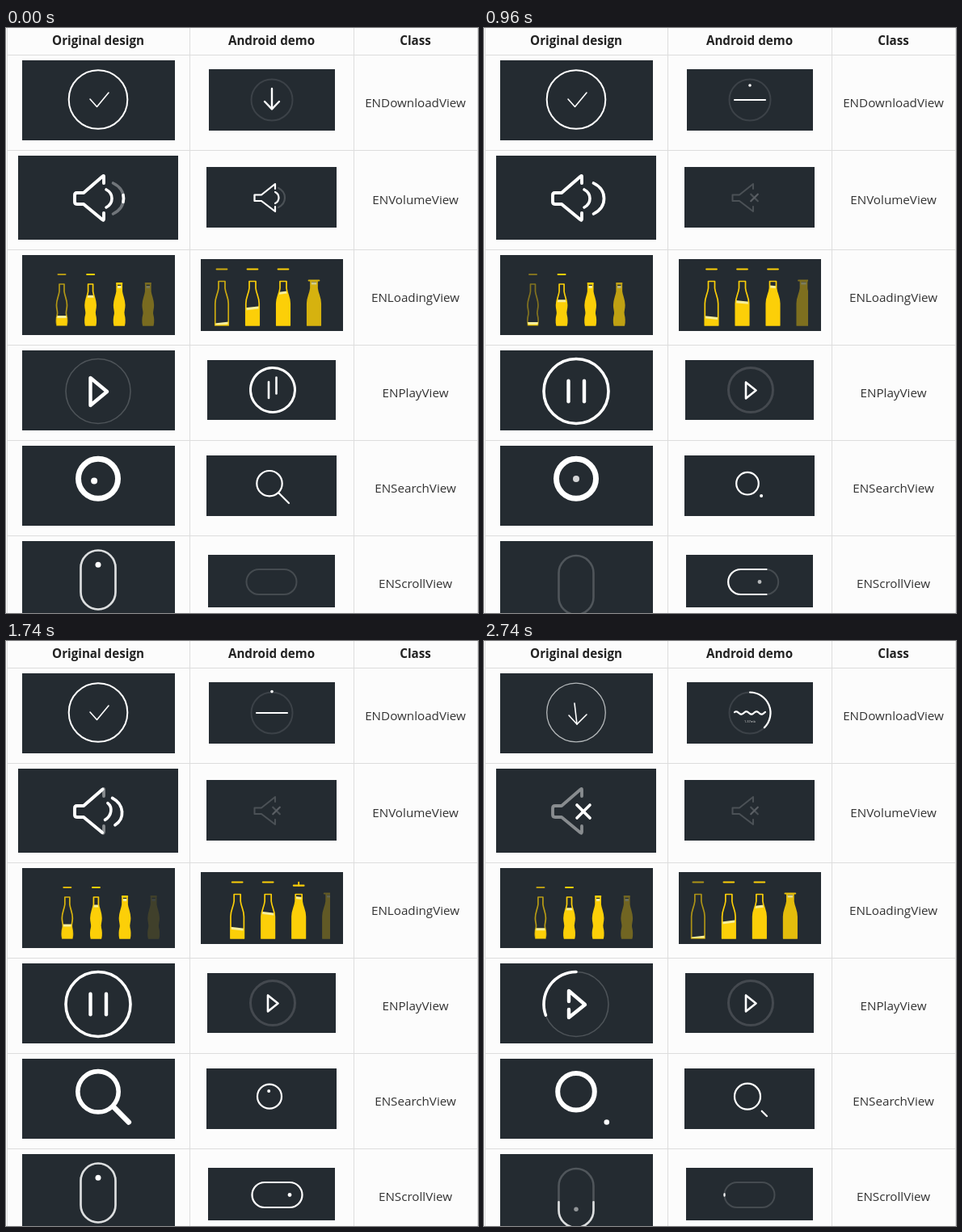
Write an HTML page that moves like this. It is 584 px wide and 724 px high and loops after 2840 ms.

```html
<!DOCTYPE html>
<html lang="en">
<head>
<meta charset="utf-8">
<title>View demos</title>
<style>
html, body { margin: 0; width: 100%; height: 100%; overflow: hidden; background: #fcfcfc; }
svg { display: block; width: 584px; height: 724px; }
text { font-family: "Open Sans", "Noto Sans", sans-serif; font-size: 15.2px; text-anchor: middle; fill: #333; }
.head { font-weight: 700; fill: #222; }
.size { fill: #ddd; }
</style>
</head>
<body>
<svg viewBox="0 0 584 724">
  <defs>
    <clipPath id="curvy"><path id="curvyShape"/></clipPath>
    <clipPath id="straight"><path id="straightShape"/></clipPath>
    <clipPath id="belt"><rect x="241" y="286" width="160" height="89"/></clipPath>
  </defs>
  <g id="table"></g>
  <g id="scene" fill="none" stroke-linecap="round" stroke-linejoin="round"></g>
</svg>
<script>
const LOOP = 2840;
// Moments at which the picture advances
const STEPS = [0, 120, 240, 390, 520, 660, 810, 960, 1110, 1230, 1380, 1500, 1620, 1740,
  1890, 2020, 2170, 2320, 2440, 2590, 2740];
const PANEL = '#242b31', YELLOW = '#fccf08', FOAM = '#f6ee9c', GREY = '#4b5156';
const $ = id => document.getElementById(id);

const clamp = (v, lo = 0, hi = 1) => Math.min(hi, Math.max(lo, v));
const lerp = (a, b, u) => Array.isArray(a) ? a.map((v, i) => lerp(v, b[i], u)) : a + (b - a) * u;
const ramp = (t, t0, t1, from = 0, to = 1) => lerp(from, to, clamp((t - t0) / (t1 - t0)));
const polar = (x, y, r, deg) => [x + r * Math.cos(deg * Math.PI / 180), y + r * Math.sin(deg * Math.PI / 180)];

const path = (d, color, w, extra = '') => `<path d="${d}" stroke="${color}" stroke-width="${w}" ${extra}/>`;
const poly = (p, w, color = '#fff', extra = '') => path('M' + p.map(q => q.join(' ')).join('L'), color, w, extra);
const dot = (x, y, r, o = 1) => `<circle cx="${x}" cy="${y}" r="${r}" fill="#fff" opacity="${o}"/>`;
const ring = (x, y, r, w, color = '#fff') => `<circle cx="${x}" cy="${y}" r="${r}" stroke="${color}" stroke-width="${w}"/>`;
const fade = (o, s) => o > 0 ? `<g opacity="${o}">${s}</g>` : '';

// Arc from the top; dir 1 runs clockwise, -1 counterclockwise
function arc(x, y, r, w, deg, dir = 1) {
  if (deg <= 0) return '';
  if (deg >= 360) return ring(x, y, r, w);
  const [ex, ey] = polar(x, y, r, dir * deg - 90);
  return path(`M${x} ${y - r}A${r} ${r} 0 ${+(deg > 180)} ${+(dir > 0)} ${ex} ${ey}`, '#fff', w);
}

// White stroke over the middle fraction f of a path
const middle = (d, w, f, color = '#fff') => f <= 0 ? '' :
  path(d, color, w, `pathLength="100" stroke-dasharray="${100 * f} 200" stroke-dashoffset="${50 * f - 50}"`);

function download(t) {
  const u = ramp(t, 2230, 2740);
  const tip = lerp([112.5, 97.5], [115, 103], u);
  let s = ring(114, 88.5, 36.3, lerp(2, 1.3, u), u > 0.5 ? '#b4b8ba' : '#fff');
  s += poly([lerp([104, 88], [105, 92], u), tip, lerp([127, 80], [127, 91], u)], 1.6);
  if (u > 0) s += poly([tip, lerp(tip, [112, 77], u)], 1.6);

  s += ring(329, 89, 25.5, 2, '#3c4248');
  const flat = ramp(t, 520, 900);
  if (flat < 1) {
    s += poly([lerp([320, 91], [309.5, 89], flat), lerp([329, 100.3], [329, 89], flat), lerp([338, 91], [348.5, 89], flat)], 2.4);
    s += poly([[329, lerp(75, 85, flat)], [329, lerp(100, 87, flat)]], 2.4);
  } else {
    const amp = ramp(t, 2020, 2170, 0, 1.7), wave = [];
    for (let x = -19; x <= 19; x++) wave.push([329 + x, 89 + amp * Math.sin(x / 2 + (t - 2170) / 900)]);
    s += poly(wave, 2.2);
    if (t < 2030) s += dot(329, ramp(t, 900, 1110, 75, 61) + ramp(t, 1230, 2020, 0, 2.5), 1.8);
  }
  s += arc(329, 89, 25.5, 2.2, (t - 2020) * 0.188);
  const size = ramp(t, 2020, 2590, 0, 4);
  if (size) s += `<text class="size" style="font-size:${size}px" x="329" y="101">${(t / 2000).toFixed(2)}mb</text>`;
  return s;
}

// Sound wave that straightens into one stroke of a cross as u goes to 1
function wave(x, y, h, bulge, cx, size, dir, u) {
  const bx = x + bulge * 4 / 3;
  const curve = [[x, y - h], [bx, y - h * 0.55], [bx, y + h * 0.55], [x, y + h]];
  const cross = [-1, -1 / 3, 1 / 3, 1].map(k => [cx + k * size * dir, y + k * size]);
  const p = lerp(curve, cross, u);
  return `M${p[0]}C${p[1]} ${p[2]} ${p[3]}`;
}

function volume(t) {
  const body = 'M121 192V184Q121 182 119 184L96 204H88Q85 204 85 207V215Q85 218 88 218H96L119 237Q121 239 121 236V229';
  const u = ramp(t, 1650, 2020) ** 1.1;
  const cx = ramp(t, 2170, 2740, 125, 123), push = ramp(t, 0, 390, -2.5, 0.5);
  const outer = wave(135 + push, 211, 19, 13, cx, 8, 1, u);
  let s = path(body, '#888c8f', 3.8) + middle(body, 3.8, ramp(t, 1560, 2060, 1, 0.5) * (t < 2060));
  s += path(outer, '#70757a', 3.6) + middle(outer, 3.6, ramp(t, 0, 300, 0.18, 1));
  s += path(wave(124, 211, 11, 7, cx, 8, -1, u), '#fff', 3.6);

  const small = 'M333 199V193L316 206.5H307.5V214H316L333 227V221';
  const v = ramp(t, 460, 900);
  const near = wave(333, 210, 7, 4.5, 334.5, 4.3, -1, v);
  s += path(small, GREY, 2) + middle(small, 2.2, ramp(t, 300, 900, 1, 0));
  s += path(wave(337, 210, 12, 8, 334.5, 4.3, 1, v), GREY, 2.2) + path(near, '#5b6065', 2.2);
  return s + fade(ramp(t, 0, 390, 0.9, 0), path(near, '#fff', 2.2));
}

const CURVY = 'M-3 317H3V326C4 333 6.5 336 6.5 343C6.5 348 5 350 5.5 354C7 360 7 364 6 368H-6' +
  'C-7 364 -7 360 -5.5 354C-5 350 -6.5 348 -6.5 343C-6.5 336 -4 333 -3 326Z';
const STRAIGHT = 'M-4 313.5H4V322C5 330 8.2 333 8.2 341V368H-8.2V341C-8.2 333 -5 330 -4 322Z';

// The glass fades in before the liquid; both fade out together
function bottle(x, shape, id, fadeIn, fadeOut, level, tilt, cap) {
  const top = `M-10 ${level - tilt}L10 ${level + tilt}`;
  return fade(fadeOut, `<g transform="translate(${x} 0)"><g clip-path="url(#${id})">` +
    `<path d="${top}V375H-10Z" fill="${YELLOW}"/>${path(top, FOAM, 3)}</g>` +
    fade(fadeIn, path(shape, YELLOW, 1.7) + cap) + '</g>');
}

function bottles(t) {
  let left = '', right = '';
  for (let x = 42 + (27 + t * 0.0653) % 35.6; x < 186; x += 35.6) {
    const drop = ramp(x, 115, 127);
    const cy = 305 + 11 * drop ** 2, half = lerp(4.5, 3.2, drop);
    const cap = poly([[-half, cy], [half, cy]], 2, YELLOW, `transform="rotate(${180 * drop} 0 ${cy})"`);
    const level = 369 - 42 * clamp((x - 58) / 55, 0, 1.2) ** 0.8;
    left += bottle(x, CURVY, 'curvy', ramp(x, 44, 82), ramp(x, 186, 160), level, 0, cap);
  }
  for (let x = 256 + (11 + t * 0.0547) % 38; x < 410; x += 38) {
    const cy = ramp(x, 358, 372, 298.5, 312.5);
    let cap = poly([[-6.3, cy], [6.3, cy]], 2.2, YELLOW);
    if (Math.abs(x - 365) < 4) cap += poly([[0, cy - 4], [0, cy]], 1.8, YELLOW);
    const level = Math.max(316, 366 - 0.505 * (x - 267));
    const tilt = -1.2 * Math.cos((x - 304) / 38 * Math.PI * 2) * (x < 366);
    right += bottle(x, STRAIGHT, 'straight', ramp(x, 256, 270), ramp(x, 410, 375), level, tilt, cap);
  }
  return left + `<g clip-path="url(#belt)">${right}</g>`;
}

// Upright pause bar as five points, and the play triangle it unfolds into
const bar = (x, y, h) => [-1, -1, 0, 1, 1].map(k => [x, y + k * h]);
const triangle = (x, y, w, h) => [[x + w, y], [x, y - h], [x, y], [x, y + h], [x + w, y]];

function play(t) {
  const tall = bar(104.5, 449.5, 12.8), big = triangle(104.5, 450, 20.5, 17);
  const open = [[118, 442], [104.5, 433], [104.5, 446], [104.5, 460], [116, 468]];
  const back = [[105, 456], [105, 466], [125, 450], [105, 433], [105, 446]];
  const closing = t > 1500;
  let s = ring(114, 449.5, 40, 1.6, '#4d5358');
  s += arc(114, 449.5, 40, 3.6, closing ? ramp(t, 2220, 2740, 360, 110) : ramp(t, 440, 900, 0, 360), closing ? -1 : 1);
  s += poly(closing ? lerp(tall.reverse(), back, ramp(t, 2200, 2740)) :
    lerp(lerp(big, open, ramp(t, 0, 390)), tall, ramp(t, 390, 860)), 4.4);
  const grown = ramp(t, 520, 880) - ramp(t, 2200, 2560);
  if (grown > 0) s += poly(bar(124, ramp(t, 2020, 2170, 449.5, 447), 12.8 * grown), 4.4);

  s += ring(330, 448, 27.5, 3, '#44494f') + arc(330, 448, 27.5, 3, ramp(t, 380, 860, 358, 0));
  s += poly(lerp(bar(325, 448, 10), triangle(324, 448.5, 12.5, 10), ramp(t, 450, 880)), 2.6);
  const rest = ramp(t, 400, 760, 1, 0);
  if (rest > 0) s += poly(bar(334.5, ramp(t, 0, 240, 442.5, 448), 10 * rest), 2.6);
  return s;
}

function search(t) {
  const out = ramp(t, 960, 1380), back = ramp(t, 2300, 2740), end = [151.8, 595.5];
  let s = ring(114, 557.8, 24.5 + 0.7 * out - 2.4 * back, 7 - 1.4 * out + 0.4 * back);
  if (t < 1300) {
    const orbit = polar(114, 558, ramp(t, 390, 960, 5.5, 0), 153 + t * 0.277);
    s += dot(...lerp(orbit, end, ramp(t, 960, 1230)), 4, ramp(t, 660, 960, 1, 0.8));
  } else {
    s += poly([end, lerp(end, [134, 577.5], ramp(t, 1300, 1740) - back)], 6.6);
  }

  const tail = [350, 588], neck = [337.5, 575.5];
  s += ring(326, 563.7, 15.7 - ramp(t, 390, 960, 0, 1.9) + ramp(t, 960, 1380, 0, 1.2) + ramp(t, 2170, 2740), 2.2);
  if (t < 800 || t > 2500) {
    const shown = t < 800 ? ramp(t, 200, 800, 1, 0) ** 0.4 : ramp(t, 2440, 2740, 0, 0.5);
    return s + poly([lerp(tail, neck, shown), tail], 2.2);
  }
  const orbit = polar(326, 564, 7, 148 + (t - 1380) * 0.32);
  const away = ramp(t, 780, 1230, 1, 0) + ramp(t, 2170, 2440);
  return s + dot(...lerp(orbit, tail, away), 2);
}

// Capsules that begin opposite to the side from which the white line grows
const upright = (x, y, r, h) =>
  `M${x} ${y}A${r} ${r} 0 0 0 ${x - r} ${y + r}v${h}a${r} ${r} 0 0 0 ${2 * r} 0v${-h}A${r} ${r} 0 0 0 ${x} ${y}`;
const lying = (x, y, r, w) =>
  `M${x} ${y}a${r} ${r} 0 0 0 ${-r} ${-r}h${-w}a${r} ${r} 0 0 0 0 ${2 * r}h${w}a${r} ${r} 0 0 0 ${r} ${-r}`;

function scroll(t) {
  const sink = ramp(t, 0, 390) - ramp(t, 960, 1380) + ramp(t, 2200, 2740);
  const mouse = upright(114, 646.5 + 6.5 * sink, 21.5, 30);
  let s = path(mouse, '#50565b', 2.6);
  s += middle(mouse, 2.6, ramp(t, 0, 1000, 1, 0) * (t < 700) + ramp(t, 960, 1380) - ramp(t, 2200, 2740, 0, 0.55), '#dcdedf');
  const seen = ramp(t, 0, 660, 1, 0) ** 0.4 + ramp(t, 1110, 1380) - ramp(t, 2200, 2740, 0, 0.5);
  s += dot(114, 664.3 + ramp(t, 0, 390, 0, 30) * (t < 1000) + ramp(t, 2200, 2740, 0, 39), 2 + 1.5 * seen, seen);

  const shift = ramp(t, 660, 1110) - ramp(t, 2170, 2740);
  const capsule = lying(359.5 + 7 * shift, 685.5, 15.5, 31);
  s += path(capsule, '#454b50', 2) + middle(capsule, 2.2, ramp(t, 600, 1110) - ramp(t, 2150, 2740, 0, 0.985));
  const lit = ramp(t, 660, 1110) - ramp(t, 2170, 2600);
  return s + dot(ramp(t, 660, 1110, 321, 351) - ramp(t, 2130, 2600, 0, 36), 685.5, 2.4, lit);
}

function drawTable() {
  const rows = [['Download', 118, 156, 76], ['Volume', 123, 161, 75], ['Loading', 118, 176, 89],
    ['Play', 118, 159, 74], ['Search', 118, 161, 75], ['Scroll', 118, 157, 65]];
  const rect = (x, y, w, h, fill) => `<rect x="${Math.floor(x)}" y="${Math.floor(y)}" width="${w}" height="${h}" fill="${fill}"/>`;
  let s = rect(0, 0, 584, 724, '#fcfcfc'), y = 33;
  for (const [name, h, w, demo] of rows) {
    const mid = y + h / 2, wide = Math.round((h - 19) * 1.905);
    s += rect(1, y, 583, 1, '#ddd') + rect(114.5 - wide / 2, y + 7, wide, h - 19, PANEL);
    s += rect(329 - w / 2, mid - 2.5 - demo / 2, w, demo, PANEL);
    s += `<text x="506.5" y="${Math.floor(mid + 6)}">EN${name}View</text>`;
    y += h;
  }
  for (const x of [1, 227, 430, 583]) s += rect(x, 0, 1, 724, '#ddd');
  [['Original design', 114], ['Android demo', 328.5], ['Class', 506.5]].forEach(([label, x]) =>
    s += `<text class="head" x="${x}" y="21">${label}</text>`);
  $('table').innerHTML = s;
}

let shown = -1;
function update(now) {
  const t = now % LOOP;
  const step = STEPS.filter(s => s <= t).pop();
  if (step === shown) return;
  shown = step;
  $('scene').innerHTML = [download, volume, bottles, play, search, scroll].map(draw => draw(step)).join('');
}

$('curvyShape').setAttribute('d', CURVY);
$('straightShape').setAttribute('d', STRAIGHT);
drawTable();
const start = performance.now();
function tick() {
  update(performance.now() - start);
  requestAnimationFrame(tick);
}
tick();
</script>
</body>
</html>
```
